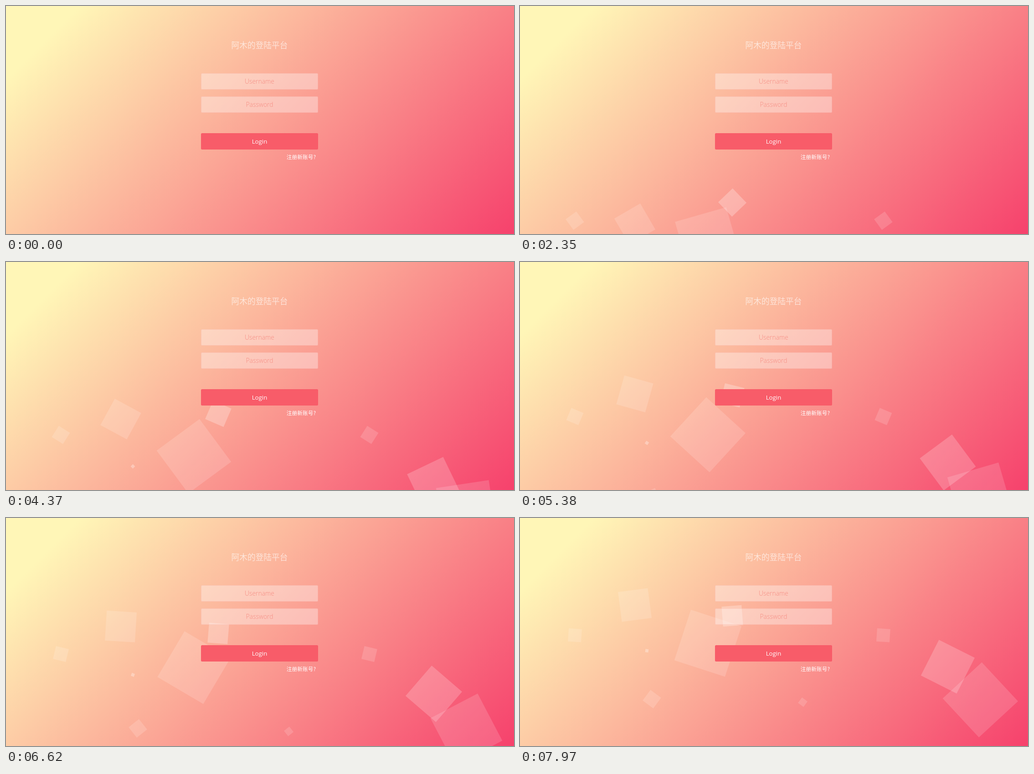
Animation, 1115 px wide and 502 px high, one loop 8 s. Source, as an HTML page:

```html
<!DOCTYPE html>
<html lang="zh-CN">
<head>
<meta charset="utf-8">
<title>Login</title>
<style>
  html, body {
    margin: 0;
    width: 100%;
    height: 100%;
    overflow: hidden;
  }
  body {
    position: relative;
    background: linear-gradient(135deg, #fff6b7 10%, #f6416c 100%);
    font-family: "Open Sans", "Noto Sans CJK SC", "Noto Sans CJK", sans-serif;
  }
  .squares {
    position: absolute;
    left: -7px;
    top: 0;
    width: 1128px;
    height: 502px;
  }
  .squares i {
    --size: calc(var(--s, 40) * .734px);
    position: absolute;
    left: var(--x);
    bottom: -140px;
    width: var(--size);
    height: var(--size);
    background: rgba(255, 255, 255, var(--a, .15));
    animation: rise var(--d, 25s) ease both paused;
    animation-delay: calc(var(--from) - var(--now, 0s));
  }
  @keyframes rise {
    from { transform: translateY(0) rotate(0deg); }
    to { transform: translateY(-514px) rotate(-120deg); }
  }
  .form > * {
    position: absolute;
    box-sizing: border-box;
    margin: 0;
    text-align: center;
    white-space: nowrap;
  }
  h1 {
    left: 428px;
    top: 70px;
    width: 257px;
    font: 500 17.7px/30px "Noto Sans CJK SC", "Noto Sans CJK", sans-serif;
    color: rgba(255, 255, 255, .62);
  }
  .field, .button {
    left: 428px;
    width: 257px;
    border-radius: 2.5px;
  }
  .field {
    height: 36px;
    border: 1px solid rgba(245, 130, 120, .2);
    background: rgba(255, 255, 255, .35);
    font-size: 13.9px;
    font-weight: 300;
    line-height: 34px;
    color: #f58a80;
  }
  .button {
    top: 279.5px;
    height: 36.5px;
    background: #f85c69;
    font-size: 13.3px;
    line-height: 36px;
    color: #fff;
  }
  .link {
    right: 435px;
    top: 322px;
    font: 400 11.75px/20px "Noto Sans CJK SC", "Noto Sans CJK", sans-serif;
    color: #fff;
  }
</style>
</head>
<body>
<div class="squares">
  <i style="--x:10%; --from:-2.7s"></i>
  <i style="--x:20%; --from:-.7s; --s:90; --d:17s"></i>
  <i style="--x:25%; --from:1.3s"></i>
  <i style="--x:40%; --from:-2.7s; --s:60; --d:22s; --a:.25"></i>
  <i style="--x:70%; --from:-2.7s"></i>
  <i style="--x:80%; --from:.3s; --s:120; --a:.2"></i>
  <i style="--x:32%; --from:-.7s; --s:160"></i>
  <i style="--x:55%; --from:1.3s; --s:20"></i>
  <i style="--x:25%; --from:-.7s; --s:10; --d:22s; --a:.3"></i>
  <i style="--x:85%; --from:2.3s; --s:160"></i>
</div>
<div class="form">
  <h1>阿木的登陆平台</h1>
  <div class="field" style="top:148px">Username</div>
  <div class="field" style="top:199px">Password</div>
  <div class="button">Login</div>
  <div class="link">注册新账号?</div>
</div>
<script>
  const LOOP = 8000, FIRST = 500, STEP = 77.84;
  const start = performance.now();

  // The squares advance in even steps after a short still opening.
  function draw() {
    const t = (performance.now() - start) % LOOP;
    const step = t < FIRST ? -1 : Math.floor((t - FIRST) / STEP + .35);
    const now = (FIRST + step * STEP) / 1000;
    document.documentElement.style.setProperty("--now", now.toFixed(4) + "s");
    requestAnimationFrame(draw);
  }
  draw();
</script>
</body>
</html>
```
